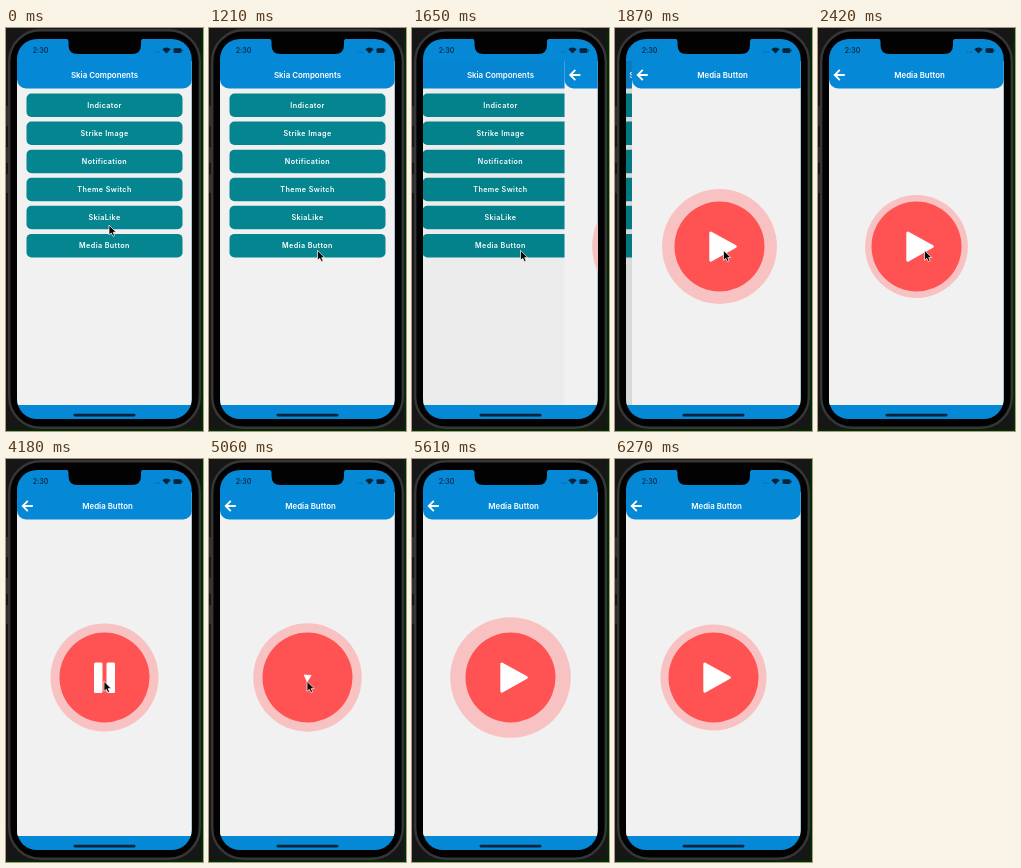
An HTML page that plays this animation: 197x403 px, repeating every 6380 ms.

```html
<!DOCTYPE html>
<html lang="en">
<head>
<meta charset="utf-8">
<title>Media button</title>
<style>
  html, body { margin: 0; width: 100%; height: 100%; overflow: hidden; background: #161616; }
  svg { display: block; width: 100%; height: 100%; }
  #scene { filter: blur(.35px); }
  text { font-family: Inter, Roboto, sans-serif; font-weight: 600; fill: #fff; text-anchor: middle; }
  .title { font-size: 7.9px; }
  .label { font-size: 7.2px; letter-spacing: .4px; }
  .clock { font-size: 7px; fill: #08304f; }
</style>
</head>
<body>
<svg viewBox="0 0 197 403">
  <defs>
    <clipPath id="screen"><rect x="11" y="11" width="174.7" height="380" rx="20"/></clipPath>
    <clipPath id="pages"><rect x="11" y="33" width="175" height="344"/></clipPath>
    <path id="header" d="M11 11H186V51.500a9 9 0 0 1-9 9H20a9 9 0 0 1-9-9Z" fill="#0588d6"/>
  </defs>

  <g id="scene">
    <!-- backdrop and phone body -->
    <rect x="-5" y="-5" width="207" height="413" fill="#161616"/>
    <path d="M196.5 -5V402.500H-5" fill="none" stroke="#002c04" stroke-width="3"/>
    <g fill="#303030">
      <rect y="78" width="3" height="20" rx="1"/>
      <rect y="119" width="3" height="16" rx="1"/>
      <rect y="146" width="3" height="19" rx="1"/>
    </g>
    <rect x="3.200" y="2.200" width="190.600" height="397.600" rx="31" fill="#020202" stroke="#363636" stroke-width="2.400"/>

    <g clip-path="url(#screen)">
      <rect x="11" y="11" width="175" height="380" fill="#0588d6"/>
      <g clip-path="url(#pages)">
        <g id="menu">
          <rect x="11" y="11" width="175" height="366" fill="#f1f1f1"/>
          <use href="#header"/>
          <text class="title" x="98.5" y="49.8">Skia Components</text>
          <g id="buttons"></g>
          <rect id="shade" x="11" y="11" width="175" height="366" opacity="0"/>
        </g>
        <g id="player">
          <rect x="11" y="11" width="175" height="366" fill="#f1f1f1"/>
          <use href="#header"/>
          <text class="title" x="101.5" y="49.8">Media Button</text>
          <path d="M26.800 47H17M21.800 41.900L16.700 47l5.100 5.100" fill="none" stroke="#fff" stroke-width="1.8"/>
          <circle id="ring" cx="98.5" cy="218.5" r="60" fill="#f9c2c2"/>
          <circle cx="98.5" cy="218.5" r="45" fill="#ff5252"/>
          <g id="icon" fill="#fff" stroke="#fff" stroke-width="3" stroke-linejoin="round">
            <path id="play" d="M-8.7-13.4L15.8 0L-8.7 13.6Z"/>
            <path id="pause" d="M-9-13.5h5.5v27.5h-5.5ZM3.5-13.5h5.5v27.5h-5.5Z"/>
          </g>
        </g>
      </g>

      <!-- status bar, notch, home indicator -->
      <text class="clock" x="34.5" y="25.2">2:30</text>
      <g fill="#06243c">
        <g opacity=".45">
          <circle cx="149.5" cy="24" r=".6"/><circle cx="151.5" cy="24" r=".6"/><circle cx="153.5" cy="24" r=".6"/>
        </g>
        <path d="M156.3 21.2a5.8 5.8 0 0 1 8.4 0L160.5 25.6Z"/>
        <rect x="167.5" y="20.2" width="8" height="4.8" rx="1.3"/>
        <rect x="176" y="21.7" width=".8" height="1.8" rx=".4"/>
        <rect x="67.5" y="385.8" width="62" height="2.6" rx="1.3"/>
      </g>
      <path d="M59 10.5c2 0 3.5 1 3.5 3V17q0 9 9 9h54.500q9 0 9-9V13.500c0-2 1.500-3 3.500-3Z" fill="#020202"/>
    </g>

    <path id="cursor" d="M0 0V10L2.300 8L3.900 11.400L5.600 10.700L4.200 7.300H7.200Z" fill="#080808" stroke="#fff" stroke-width=".7" stroke-linejoin="round"/>
  </g>
</svg>

<script>
const LOOP = 6380, STEP = 110;
const PUSH = 1610;                    // the player page slides in
const PULSE = 1000, RING_MAX = 60.3, RING_MIN = 49.3;
const TOGGLES = [3012, 4652], HALF = 300;
const CURSOR = [                      // time, x, y
  [0, 103, 197], [700, 103, 197], [1180, 108.5, 222.3],
  [2250, 108.5, 222.3], [2800, 98, 222.3],
  [5280, 98, 222.3], [5640, 104, 406]
];

const $ = id => document.getElementById(id);
const clamp = x => Math.min(1, Math.max(0, x));
const ease = x => x < .5 ? 2 * x * x : 1 - 2 * (1 - x) ** 2;
const mix = (a, b, p) => a + (b - a) * p;
const move = (id, x, y = 0, rest = "") =>
  $(id).setAttribute("transform", `translate(${x} ${y}) ${rest}`);

$("buttons").innerHTML =
  ["Indicator", "Strike Image", "Notification", "Theme Switch", "SkiaLike", "Media Button"]
    .map((name, i) => {
      const y = 65.5 + i * 28.08;
      return `<rect x="20.5" y="${y}" width="156" height="23.5" rx="5" fill="#04858f"/>
        <text class="label" x="98.5" y="${y + 14.3}">${name}</text>`;
    }).join("");

function slide(t) {
  const w = Math.max(0, t - PUSH) / 50;
  const left = (1 + w) * Math.exp(-w);   // critically damped spring
  move("player", 175 * left);
  move("menu", -52.5 * (1 - left));
  $("shade").setAttribute("opacity", .1 * (1 - left));
}

function pulse(t) {
  const phase = Math.max(0, t - PUSH) / PULSE % 2;
  $("ring").setAttribute("r", mix(RING_MIN, RING_MAX, Math.abs(1 - phase)));
}

// Each toggle spins the icon away, swaps it, and spins the other one in.
function toggle(t) {
  let size = 1, swaps = 0;
  for (const start of TOGGLES) {
    const p = (t - start) / HALF;
    if (p >= 1) swaps++;
    if (p > 0 && p < 2) size = p < 1 ? 1 - ease(p) : ease(p - 1);
  }
  $("play").style.display = swaps % 2 ? "none" : "";
  $("pause").style.display = swaps % 2 ? "" : "none";
  move("icon", 98.5, 218.5, `rotate(${360 * size}) scale(${size})`);
}

function point(t) {
  let i = 0;
  while (i < CURSOR.length - 2 && t >= CURSOR[i + 1][0]) i++;
  const [t0, x0, y0] = CURSOR[i], [t1, x1, y1] = CURSOR[i + 1];
  const p = ease(clamp((t - t0) / (t1 - t0)));
  move("cursor", mix(x0, x1, p), mix(y0, y1, p));
}

function draw(now) {
  const t = Math.floor(now % LOOP / STEP) * STEP;
  slide(t);
  pulse(t);
  toggle(t);
  point(t);
}

const begin = performance.now();
function tick() {
  draw(performance.now() - begin);
  requestAnimationFrame(tick);
}
tick();
</script>
</body>
</html>
```
